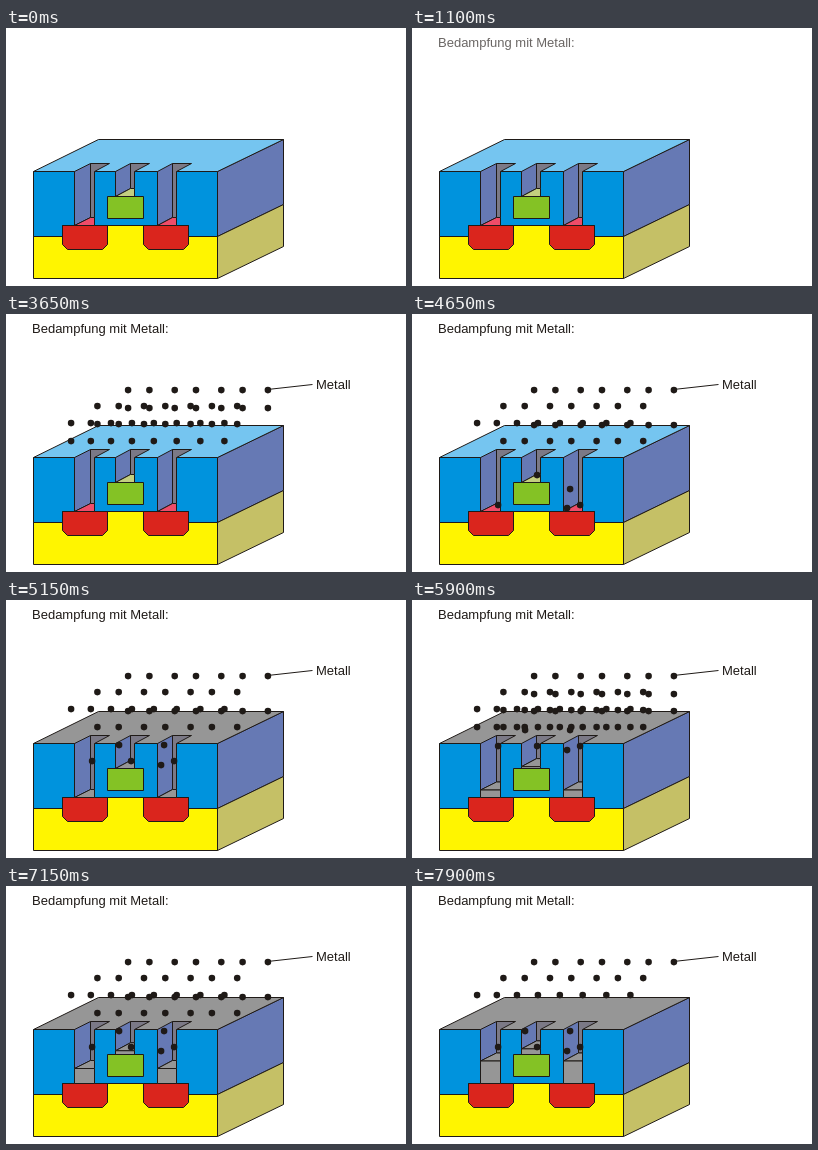
These frames come from a looping animation (400x258 px, 8000 ms). An HTML page with a canvas:

```html
<!DOCTYPE html>
<html lang="de">
<head>
<meta charset="utf-8">
<style>
html, body { margin: 0; overflow: hidden; background: #fff; }
canvas { display: block; }
</style>
</head>
<body>
<canvas id="stage" width="400" height="258"></canvas>
<script>
const ctx = document.getElementById('stage').getContext('2d');
const LOOP = 8000, FALL_START = 3650, LAST_FALL = 7650, STEP = 250;
const INK = '#1f1a17', BLUE = '#0093dd', SIDE = '#6679b4', BACK = '#7b7986', RED = '#da251d', METAL = '#969696';

function shape(fill, ...points) {
  ctx.beginPath();
  for (let i = 0; i < points.length; i += 2) ctx.lineTo(points[i], points[i + 1]);
  ctx.closePath();
  ctx.fillStyle = fill;
  ctx.fill();
  ctx.stroke();
}

function box(fill, x1, y1, x2, y2) {
  shape(fill, x1, y1, x2, y1, x2, y2, x1, y2);
}

function dot(x, y) {
  ctx.beginPath();
  ctx.arc(x - .4, y - .4, 3.3, 0, 7);
  ctx.fillStyle = INK;
  ctx.fill();
}

// Rows of vapour, slightly uneven, moved down by drop
function wave(drop, rows) {
  for (let i = 0; i < 8; i++) {
    const x = 122 + 23.3 * i - 2 * (i % 2);
    if (i < 7) {
      dot(x, 76 + drop);
      dot(x - 30.7, 92 + drop);
    }
    if (rows > 2) dot(65 + 21.9 * i - 5 * Math.sin(Math.PI * i / 7), 109 + drop);
  }
}

// Vapour that sinks into the trenches and settles on their floors
function sink(phase, film) {
  const fall = (x, y, floor) => dot(x, Math.min(y + 15 * phase, floor));
  fall(113, 130, 190);
  fall(158, 130, 190);
  fall(86, 146, 192 - film);
  fall(125, 146, 161);
  fall(168, 146, 192 - film);
  fall(155, 150, 194 - film);
}

function vapour(t, film) {
  wave(0, 3);
  const step = Math.floor((t - FALL_START) / STEP);
  if (step < 0) return;
  if (step === 0) return wave(18, 3);
  const phase = (t < LAST_FALL ? step - 1 : step) % 4;
  if (phase === 0) wave(18, 3);
  if (t < LAST_FALL + STEP) wave(phase === 2 ? 21 : 35, 2);
  sink(phase, film);
}

function trench(left, right, bottom, film, floor) {
  const top = bottom - film, back = right - 4;
  shape(SIDE, left, 143, back, 135, back, top - 8, left, top);
  shape(BACK, back, 135, right + 15, 135, right, 143, right, top - 8, back, top - 8);
  shape(floor, left, top, back, top - 8, right, top - 8, right, top);
  if (film) box(METAL, left, top, right, bottom);
}

function doped(left, right) {
  shape(RED, left, 197, right, 197, right, 216, right - 5, 221, left + 5, 221, left, 216);
}

function block(coated, film) {
  shape(SIDE, 211, 143, 277, 111, 277, 176, 211, 208);
  shape('#c5c066', 211, 208, 277, 176, 277, 218, 211, 250);
  shape(coated ? METAL : '#75c5f0', 27, 143, 92, 111, 277, 111, 211, 143);
  box('#fff500', 27, 197, 211, 250);
  shape(BLUE, 27, 143, 211, 143, 211, 208, 182, 208, 182, 197, 56, 197, 56, 208, 27, 208);
  doped(56, 101);
  doped(137, 182);
  const floor = coated ? METAL : '#ef4c68';
  trench(68, 88, 197, film, floor);
  trench(109, 128, 168, film / 4, coated ? METAL : '#c3cf80');
  trench(151, 170, 197, film, floor);
}

// Text fades in with three steps of 100 ms
function label(t, start, text, x, y) {
  ctx.globalAlpha = Math.max(0, Math.min(1, (Math.floor((t - start) / 100) + 1) / 3));
  ctx.fillStyle = INK;
  ctx.fillText(text, x, y);
}

function draw(t) {
  const layers = [5900, 6900, LAST_FALL].filter(start => t >= start).length;
  const film = 7.5 * layers;
  ctx.setTransform(1, 0, 0, 1, 0, 0);
  ctx.clearRect(0, 0, 400, 258);
  ctx.font = '13px "Liberation Sans", Arial, sans-serif';
  ctx.strokeStyle = INK;
  ctx.lineJoin = 'round';
  label(t, 1000, 'Bedampfung mit Metall:', 26, 19);
  label(t, 2450, 'Metall', 310, 75);
  ctx.translate(.5, .5);
  ctx.beginPath();
  ctx.moveTo(261, 75);
  ctx.lineTo(306, 70);
  ctx.stroke();
  ctx.globalAlpha = 1;
  block(t >= 4900, film);
  if (t >= 2200) vapour(t, film);
  box('#84c225', 101, 168, 137, 190);
}

const start = performance.now();
function tick(now) {
  draw(Math.max(0, now - start) % LOOP);
  requestAnimationFrame(tick);
}
tick(start);
</script>
</body>
</html>
```
